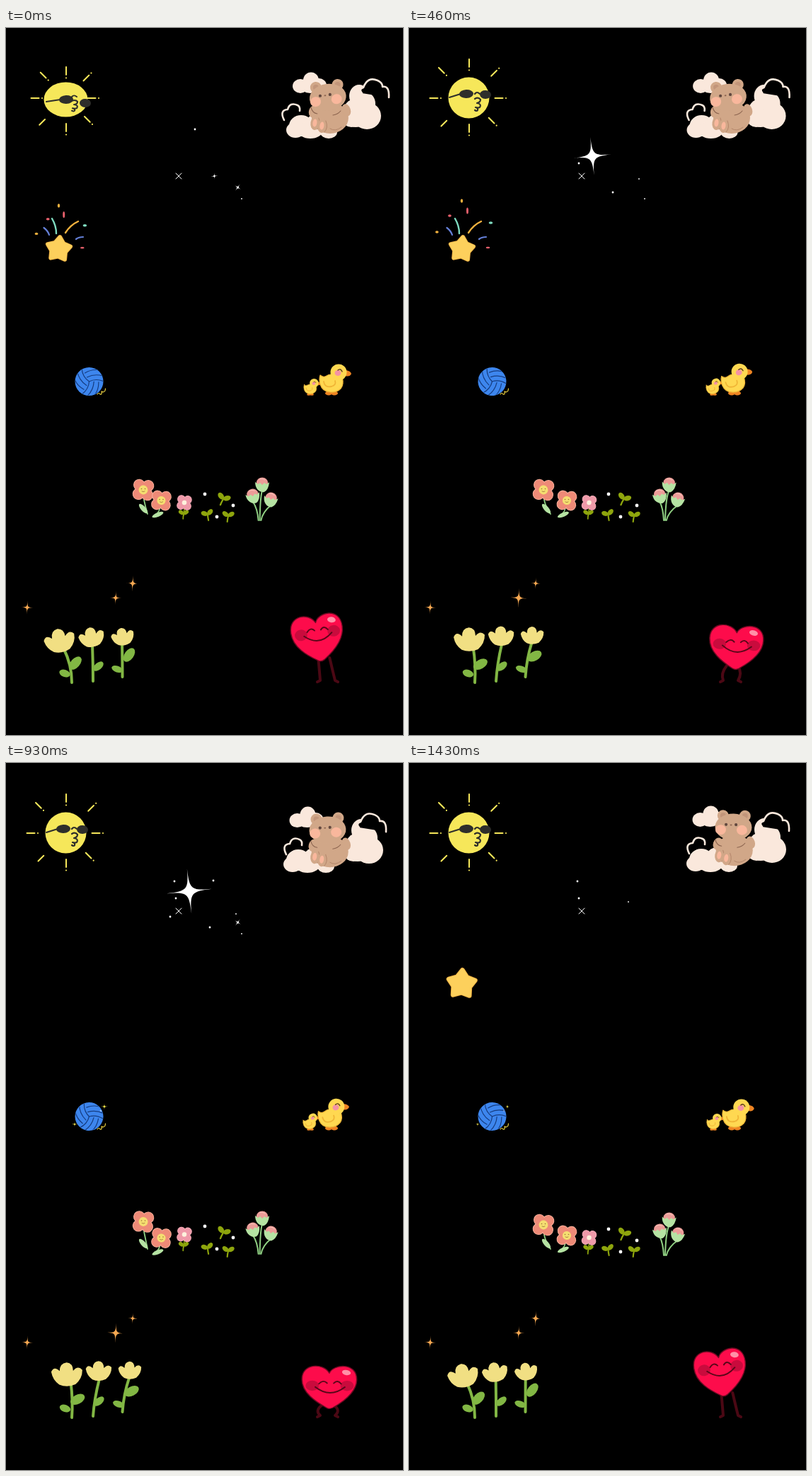
An HTML page with a canvas for the animation above (1460 ms loop, 561 px wide and 998 px high).

```html
<!DOCTYPE html>
<html lang="en">
<head>
<meta charset="utf-8">
<title>Stickers</title>
<style>
html, body { margin: 0; width: 100%; height: 100%; overflow: hidden; background: #000; }
canvas { display: block; width: 100vw; height: 100vh; }
</style>
</head>
<body>
<canvas id="stage" width="561" height="998"></canvas>
<script>
const g = document.getElementById('stage').getContext('2d');
const LOOP = 1460, TAU = Math.PI * 2;
const { sin, cos, min, max } = Math;
let t = 0;

// Timing rules
const smooth = u => (u = max(0, min(1, u)), u * u * (3 - 2 * u));
const wave = (from, period) => (1 - cos(TAU * (t - from) / period)) / 2;
const swing = () => sin(Math.PI * t / LOOP);
const blink = (on, length, period = LOOP) => (t - on + 2 * period) % period < length;

// Drawing helpers
function oval(x, y, rx, ry, color, rot = 0) {
  g.beginPath();
  g.ellipse(x, y, rx, ry, rot, 0, TAU);
  g.fillStyle = color;
  g.fill();
}
const dot = (x, y, r, color) => oval(x, y, r, r, color);
function shape(d, color) {
  g.fillStyle = color;
  g.fill(new Path2D(d));
}
function line(d, color, width) {
  g.strokeStyle = color;
  g.lineWidth = width;
  g.stroke(new Path2D(d));
}
function place(x, y, rot, sx, sy, draw) {
  g.save();
  g.translate(x, y);
  g.rotate(rot);
  g.scale(sx, sy);
  draw();
  g.restore();
}
const shift = (x, y, draw) => place(x, y, 0, 1, 1, draw);
const sparkle = (x, y, rx, ry, color, rot = 0) => place(x, y, rot, rx, ry, () => shape(
  'M0,-1C.02,-.08 .08,-.02 1,0C.08,.02 .02,.08 0,1C-.02,.08 -.08,.02 -1,0C-.08,-.02 -.02,-.08 0,-1Z', color));

function sun() {
  const yellow = '#f6e75a', dark = '#2e2e2b';
  const k = 1 - smooth(t / 360);
  for (let i = 0; i < 8; i++) {
    const a = i * TAU / 8, c = cos(a), s = sin(a);
    const r = 46 - 4 * c - 3.5 * s + i % 2 * 4 - k * k * (6 - 5 * s);
    const at = d => [85 + (r + d) * c, 99 + (r + d) * s];
    line(`M${at(-5.5)}L${at(5.5)}`, yellow, 2);
    if (i !== 3) dot(...at(c + s < -.1 ? -10 : 10), 1.1, yellow);
  }
  oval(84.5, 98.5 + 2.5 * k, 29 + 2 * k, 29 - 4.5 * k, yellow);
  const x = 81 + 4 * k, left = 93 + 8 * k, right = 94 + 12 * k;
  line(`M57,${98 + 6 * k}L${x - 8},${left}`, dark, 2);
  oval(x, left, 10, 6, dark, -.05);
  oval(x + 27, right, 8, 6, dark, .05);
  place(97, 107 + 2 * k, 0, 1, 1 - .15 * k, () =>
    line('M-4,-14Q-1,-18 3,-14M-4,-7Q1,-10 4,-6Q4,-2 -1,-1Q6,0 3,5Q0,6 -3,5Q1,6 0,9Q-1,11 -4,9', dark, 2.2));
}

function bear() {
  const cream = '#fae8dc', tan = '#d1a788', shade = '#b3866a', brown = '#8d6550', pink = '#f9b79c';
  const drift = smooth(t / 600), lean = wave(480, 1900), rise = t > 480 ? lean : 0;
  const dx = 7.5 * lean - 4, dy = -7.5 * rise;
  const cloud = (dir, ...puffs) => shift(dir * drift, -2 * rise, () => puffs.forEach(p => oval(...p, cream)));
  const outline = (dir, d) => shift(dir * drift, -2 * rise, () => {
    shape(d, '#000');
    line(d, cream, 2.6);
  });
  cloud(-4.5, [431, 74, 11, 11.5], [416, 82, 11, 10], [442, 81, 11, 10], [430, 83, 14, 9]);
  cloud(3, [499, 96, 14, 16], [510, 124, 20, 19], [494, 120, 18, 20], [509, 107, 13, 16], [488, 130, 12, 10]);
  cloud(-4, [417, 138, 17, 15], [409, 144, 13, 11], [430, 144, 18, 12], [456, 147, 12, 9], [440, 135, 16, 14]);
  outline(-4, 'M503,92Q498,86 505,84Q511,68 525,74Q532,77 532,83Q542,81 541,98');
  outline(3, 'M393,130Q386,116 398,115Q401,104 412,109Q416,111 415,117');

  shift(dx / 2, dy / 2, () => {
    oval(458, 127, 26, 22, tan);
    oval(481, 116, 6, 9, tan, -.3);
    oval(435, 118, 7, 9, tan, .3);
    line('M431,112Q433,120 440,121M462,123Q469,122 473,117', brown, 1.1);
    for (const [x, y] of [[437, 134], [447, 138]]) {
      oval(x, y, 6.5, 10, tan, .15);
      line(`M${x + 5},${y - 7}Q${x + 9},${y + 3} ${x + 3},${y + 9}`, shade, 1);
      oval(x - .5, y, 3, 5.5, pink, .15);
    }
    line('M458,142Q465,147 474,140', shade, 1);
  });
  place(454 + dx, 98 + dy, .15 * rise - .13, 1, 1, () => {
    for (const side of [-1, 1]) {
      dot(1.5 + side * 15.5, -16, 8, tan);
      dot(1.5 + side * 15.5, -16, 4, '#c2957a');
    }
    oval(1, 0, 26, 19, tan);
    for (const side of [-1, 1]) {
      oval(-2 + side * 15, 4, 7.5, 7, pink);
      dot(-2.5 + side * 7, -3.5, 2.1, '#62483f');
    }
    oval(-2.5, -3, 1.4, 1, brown);
  });
}

function twinkles() {
  // x, y, then switch-on time, length and optional period
  const dots = [
    [267, 143, 0, 260, 520], [293, 166, 480, 820], [238, 167, 800, 660], [240, 191, 100, 950, 1270],
    [232, 217, 100, 160, 770], [310, 196, 1050, 410], [325, 213, 300, 180, 570],
    [288, 232, 280, 1000], [333, 241, 0, 1000]
  ];
  for (const [x, y, ...timing] of dots) if (blink(...timing)) dot(x, y, x > 300 ? .9 : 1.4, '#fff');
  if (blink(200, 880)) {
    const size = 26 + 6 * cos(TAU * (t - 330) / 600);
    sparkle(259, 181, size, size, '#fff', -.1);
  }
  line('M240,205L248,213M248,205L240,213', '#fff', 1);
  if (blink(0, 80)) sparkle(294.5, 209, 5, 5, '#fff', -.1);
  if (blink(-60, 140, 930)) sparkle(327.5, 225, 6, 6, '#fff', .6);
}

function firework() {
  const gone = t > 780;
  if (gone && t < 1080) return;
  const size = gone ? .9 + .25 * (t - 1080) / 350 : 1;
  place(74.5, 312, gone ? .05 : .1, size, size, () => {
    let d = 'M';
    for (let i = 0; i < 10; i++) {
      const a = i * TAU / 10 - TAU / 4, r = i % 2 ? 10.5 : 17;
      d += `${r * cos(a)},${r * sin(a)} `;
    }
    line(d + 'Z', '#e9a93f', 6);
    line(d + 'Z', '#fdd05c', 4.4);
    shape(d + 'Z', '#fdd05c');
  });
  if (gone) return;
  const red = '#e8606c', gold = '#f2b23e', mint = '#7fdcc0', blue = '#6580d8';
  const spread = .9 + .1 * smooth(t / 160);
  const confetti = [
    [0, -68, 1.7, 2.8, gold], [8, -54, 1.5, 4.5, red], [-17, -47, 2.4, 1.8, red],
    [41, -37, 2.8, 1.8, mint], [-35, -24, 2.3, 1.7, gold], [37, -2, 2.8, 1.2, red]
  ];
  for (const [x, y, rx, ry, color] of confetti) oval(74.5 + x * spread, 312 + y * spread, rx, ry, color);
  line('M65,269Q71,279 71,290', mint, 2.4);
  line('M84,289Q91,278 102,273', gold, 2.4);
  line('M53.5,282Q59,286 61,292M99,298Q103,295 109,295', blue, 2.2);
}

function ball() {
  place(117.5, 499, .2 * swing(), 1, 1, () => {
    dot(0, 0, 20, '#3d86ee');
    g.beginPath();
    g.arc(0, 0, 19.5, 0, TAU);
    g.clip();
    for (let i = 0; i < 3; i++) {
      g.rotate(TAU / 3);
      line('M0,0Q10,-5 21,0M-3,-6Q9,-12 22,-7M-6,-12Q4,-18 14,-16', '#153c80', 1.2);
    }
  });
  line('M129,517Q131,514 133,517Q136,518 135,513Q138,515 140,512L140.5,509', '#efd543', 1.2);
  const glow = 5.5 * max(0, sin(Math.PI * (t - 480) / 1300));
  sparkle(139, 485, glow, glow, '#f8e94e');
  sparkle(97, 510, glow * .85, glow * .85, '#f8e94e');
  sparkle(134, 491, glow * .5, glow * .5, '#fff');
}

function duck(x, y, size) {
  const yellow = '#ffd851', edge = '#f0b536', orange = '#ee8422';
  place(x, y, 0, size, size, () => {
    oval(-4, -1.5, 5, 3, orange);
    oval(4, -1.5, 5, 3, orange);
    g.rotate(-.11 * swing());
    shape('M20,-34Q27,-33 28,-29Q26,-24 19,-26Z', orange);
    const body = 'M-16,-27Q-12,-23 -7,-26Q-1,-30 4,-26L15,-24Q18,-14 13,-8Q7,-2 -2,-3Q-13,-4 -16,-14Q-18,-21 -16,-27Z';
    shape(body, yellow);
    line(body, edge, 1.2);
    dot(10, -31, 11.5, yellow);
    line('M-11,-18Q-10,-9 0,-11Q7,-13 5,-19', edge, 1.8);
    oval(9, -30, 4.5, 4, '#f493a4');
    line('M9,-34Q13,-37 15,-32', '#57351f', 1.4);
  });
}

function bloom(x, y, r, color, edge, center, core) {
  place(x, y, .1, r, r, () => {
    for (const rim of [.05, 0]) for (let i = 0; i < 4; i++) {
      const a = (i + .5) * TAU / 4;
      dot(.53 * cos(a), .53 * sin(a), .44 + rim, rim ? edge : color);
    }
    dot(0, 0, core, center);
  });
}

function garden() {
  // Everything steps around a small rectangle, four corners per second.
  const pose = Math.floor(t / 250) % 4;
  const hop = (x, y, dx, dy) => [x + (pose === 1 || pose === 2 ? dx : 0), y + (pose > 1 ? dy : 0)];
  const leaf = '#b5e3a3', stem = '#8fcf82', olive = '#8ea50d', ink = '#9a7138';

  const [ax, ay] = hop(194, 652, -4, -4.5), [bx, by] = hop(219.5, 667, 3.5, 3.5);
  line(`M${ax + 1},${ay + 14}Q${ax + 3},${ay + 24} 200,686`, stem, 1.8);
  oval(194, 678.5, 8.5, 3.3, leaf, .85);
  line(`M${bx - 2},${by + 10}Q${bx - 3},${by + 18} ${bx - 12},${by + 23}`, stem, 1.8);
  oval(bx - 5, by + 20, 8.5, 3, leaf, -.4);
  for (const [x, y, r] of [[ax, ay, 17], [bx, by, 16]]) {
    bloom(x, y, r, '#ee8a77', '#f8b5a0', '#f5de71', .38);
    dot(x - 2.5, y - 1.5, .8, ink);
    dot(x + 2.5, y - 1.5, .8, ink);
    line(`M${x - 2},${y + 2}Q${x},${y + 3.5} ${x + 2},${y + 2}`, ink, .8);
  }

  const sprout = (x, y, rot, size) => place(x, y, rot, size, size, () => {
    line('M0,0Q-1,5 -1,9', olive, 2.4);
    for (const side of [-1, 1]) oval(side * 4.5, -3, 5.5, 3.7, olive, side * -.6);
  });
  const [px, py] = hop(252, 670, 2.5, -4.5);
  line(`M${px},${py + 8}L${px - 1},${py + 18}`, olive, 1.6);
  sprout(px - 1, py + 16, 0, .75);
  bloom(px, py, 12, '#ef9aa9', '#f5b3bd', '#fdf1dc', .27);

  for (const p of [[281, 658], [321, 674], [298, 690]]) dot(...hop(...p, 1, -4), 2.4, '#fff');
  sprout(...hop(307, 665, -3.5, -2), .35, 1);
  sprout(...hop(285, 687, -3.5, -2), -.25, .9);
  sprout(...hop(314, 689, 4, 0), .05, .9);

  const buds = [[362, 645], [349, 661], [374, 666]].map(p => hop(...p, 5.5, -2));
  const [rx, ry] = hop(358, 695, 3, -2);
  buds.forEach(([x, y]) => line(`M${x},${y + 8}Q${rx + (x - rx) * .3},${y + 17} ${rx + (x - rx) * .15},${ry}`, stem, 2));
  buds.forEach(([x, y]) => place(x, y, (x - rx - 3) * .017, 1, 1, () => {
    oval(0, -3, 8.2, 7.5, '#ec9c98');
    line('M-4,-8Q0,-10 4,-7', '#f7c1b8', 1);
    shape('M-10,-4L-6,-1L-3,-3L0,0L3,-3L6,-1L10,-4Q9,7 3,10Q-2,11 -6,7Q-10,3 -10,-4Z', leaf);
  }));
}

function tulips() {
  const green = '#82b744', u = swing();
  // head x and y, size, stem offset, stem foot x and y
  const stems = [[76, 866, 1, 5.5, 93, 924], [121, 861, .83, 1, 123, 922], [165, 860, .74, -1, 164.5, 916]];
  for (const [x, y, size, off, footX, footY] of stems) {
    const hx = x + 11 * u, hy = y - 2 * u;
    line(`M${hx + off},${hy + 10}Q${footX + 2 * u},${footY - 25} ${footX},${footY}`, green, 4);
    place(hx, hy, (u - 1) * .2, size, size, () => shape(
      'M-22,-5Q-18,-14 -10,-6Q-10,-17 0,-18Q9,-17 9,-6Q16,-14 22,-7Q22,5 12,13Q0,18 -11,13Q-20,7 -22,-5Z', '#f1df83'));
  }
  oval(98 + 3.5 * u, 896.5 + 2 * u, 11, 6.5, green, -.85 + .4 * u);
  oval(174 + 4 * u, 885 + 2 * u, 11, 6.5, green, -.95 + .5 * u);
  oval(130.5 + u, 901, 8.5, 5, green, -.7);
  oval(83 + .5 * u, 911, 8, 5, green, .35);
  oval(157 + 2 * u, 905, 8, 4.5, green, .35);

  const star = (x, y, r) => sparkle(x, y, r * .9, r * 1.08, '#f5a852', .07);
  star(30, 818, 9);
  star(155, 804.5, 9 + 4.5 * u);
  star(179, 784, 10.5 - 3.5 * u);
}

function heart() {
  const wine = '#4b0814', cheek = '#c90b3d';
  const hops = min(t, 1300), side = (1 - cos(TAU * hops / 1300)) / 2, squash = sin(TAU * hops / 1300) ** 2;
  const x = 440.5 + 27 * side, y = 861 + 21 * squash;
  for (const leg of [-1, 1]) {
    const hip = 454 + leg * 8 + (x - 454) * .35, foot = 454.5 + leg * 10.5, top = y + 28 - 3 * squash;
    line(`M${hip},${top}Q${(hip + foot) / 2 + leg * squash * 10},${(top + 922) / 2} ${foot},921L${foot + leg * 4},923`, wine, 4);
  }
  place(x, y, .24 * side - .14, .99 + .06 * squash, .99 - .09 * squash, () => {
    const d = 'M0,-22C5,-36 37,-40 37,-12C37,9 17,24 5,32Q0,35 -4,32C-18,23 -37,9 -37,-12C-37,-38 -8,-38 0,-22Z';
    shape(d, '#fd0c4b');
    line(d, '#6e0a22', 1.5);
    oval(23, -23, 6, 4, '#ff91a8', .25);
    g.translate(1, 5 * squash);
    oval(-24, -7, 9, 8, cheek);
    oval(23, -7, 9, 8, cheek);
    line('M-20,-5Q0,13 20,-5M-15,-10Q-9,-17 -4,-11M5,-11Q10,-17 15,-10', '#5a0719', 2);
  });
}

const start = performance.now();
function draw() {
  t = (performance.now() - start) % LOOP;
  g.fillStyle = '#000';
  g.fillRect(0, 0, 561, 998);
  g.lineCap = g.lineJoin = 'round';
  sun();
  bear();
  twinkles();
  firework();
  ball();
  duck(430, 518, .54);
  duck(460, 517, 1);
  garden();
  tulips();
  heart();
  requestAnimationFrame(draw);
}
draw();
</script>
</body>
</html>
```
